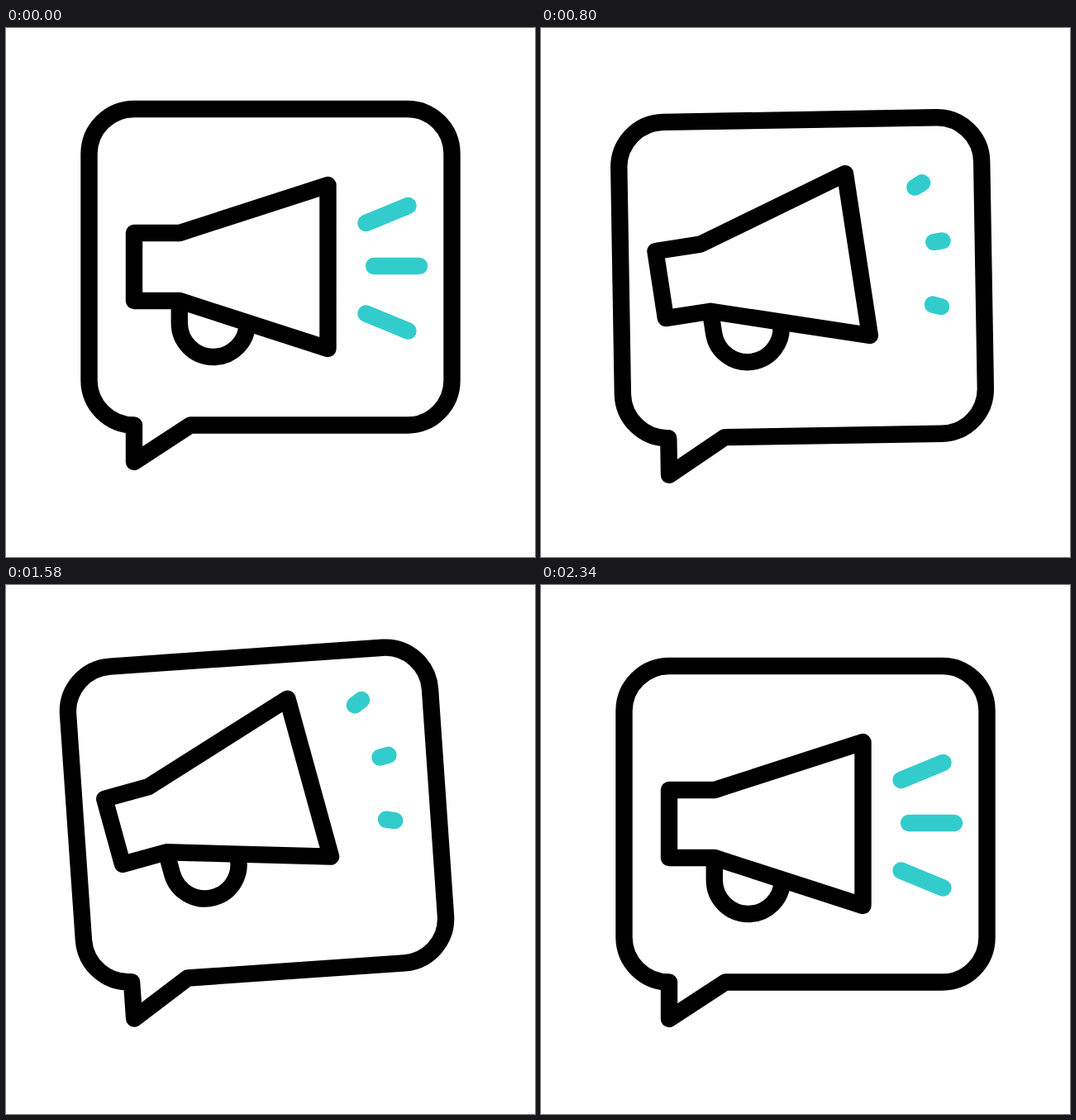
An HTML page without scripts that plays this animation: 640x640 px, repeating every 2.62 s.

```html
<!DOCTYPE html>
<html lang="en">
<head>
<meta charset="utf-8">
<title>Megaphone bubble</title>
<style>
html, body {
  margin: 0;
  width: 100%;
  height: 100%;
  overflow: hidden;
  background: #fff;
}
svg {
  display: block;
  width: 100%;
  height: 100%;
}
path {
  fill: none;
  stroke: #000;
  stroke-width: 20.4;
  stroke-linecap: round;
  stroke-linejoin: round;
}
.bubble, .horn, .mouth, .rays path {
  animation: 2620ms cubic-bezier(.33, 0, .67, 1) infinite;
}
.bubble {
  transform-origin: 155px 523px;
  animation-name: bob, sway;
}
.horn {
  transform-origin: 193px 340px;
  animation-name: tilt;
}
.mouth { animation-name: pump; }
.rays path {
  stroke: #3cc;
  stroke-dasharray: 1 9;
  animation-name: shout;
}

@keyframes bob {
  0%, 8.6% { translate: 0 0; }
  20.04% { translate: 0 -7px; }
  36.53% { translate: 0 25.5px; }
  53.9% { translate: 0 -16px; }
  69.4% { translate: 0 25.5px; }
  84%, 100% { translate: 0 0; }
}
@keyframes sway {
  0%, 7.6% { rotate: 0deg; }
  23.36% { rotate: -3deg; }
  39.85% { rotate: 2deg; }
  56.34% { rotate: -5deg; }
  72.82% { rotate: 2deg; }
  89.31%, 100% { rotate: 0deg; }
}
@keyframes tilt {
  0%, 8.4% { rotate: 0deg; }
  25.57% { rotate: -10deg; }
  45.61% { rotate: 4.5deg; }
  65.84% { rotate: -15deg; }
  86.45%, 100% { rotate: 0deg; }
}
/* only the wide end slides along the horn's axis */
@keyframes pump {
  0%, 12.6% { d: path("M210 330H155V248H210L389.5 190V388Z"); }
  27.37% { d: path("M210 330H155V248H210L397.5 190V388Z"); }
  43.85% { d: path("M210 330H155V248H210L383 190V388Z"); }
  60.34% { d: path("M210 330H155V248H210L400.5 190V388Z"); }
  76.83% { d: path("M210 330H155V248H210L383 190V388Z"); }
  89.31%, 100% { d: path("M210 330H155V248H210L389.5 190V388Z"); }
}
/* rays leave at the far end and grow again from the near end */
@keyframes shout {
  0%, 21.3% { stroke-dashoffset: 0; }
  34.47% { stroke-dashoffset: -1.03; }
  34.48%, 42.94% { stroke-dashoffset: 1.03; }
  52.29% { stroke-dashoffset: 0; }
  63.74% { stroke-dashoffset: -1.03; }
  63.75%, 65.84% { stroke-dashoffset: 1.03; }
  79%, 100% { stroke-dashoffset: 0; }
}
</style>
</head>
<body>
<svg viewBox="0 0 640 640">
  <g class="bubble">
    <path d="M155 525L223 480.5H485.5A54 54 0 0 0 539.5 426.5V152A54 54 0 0 0 485.5 98H155A54.5 54.5 0 0 0 100.5 152V426.5A54.5 54.5 0 0 0 155 480.5Z"/>
    <g class="horn">
      <path d="M209.8 334V357A41 41 0 0 0 291.8 357"/>
      <path class="mouth" d="M210 330H155V248H210L389.5 190V388Z"/>
      <g class="rays">
        <path pathLength="1" d="M435.5 236L486.5 215"/>
        <path pathLength="1" d="M445 288H500"/>
        <path pathLength="1" d="M435.5 345.5L486.5 366.5"/>
      </g>
    </g>
  </g>
</svg>
</body>
</html>
```
